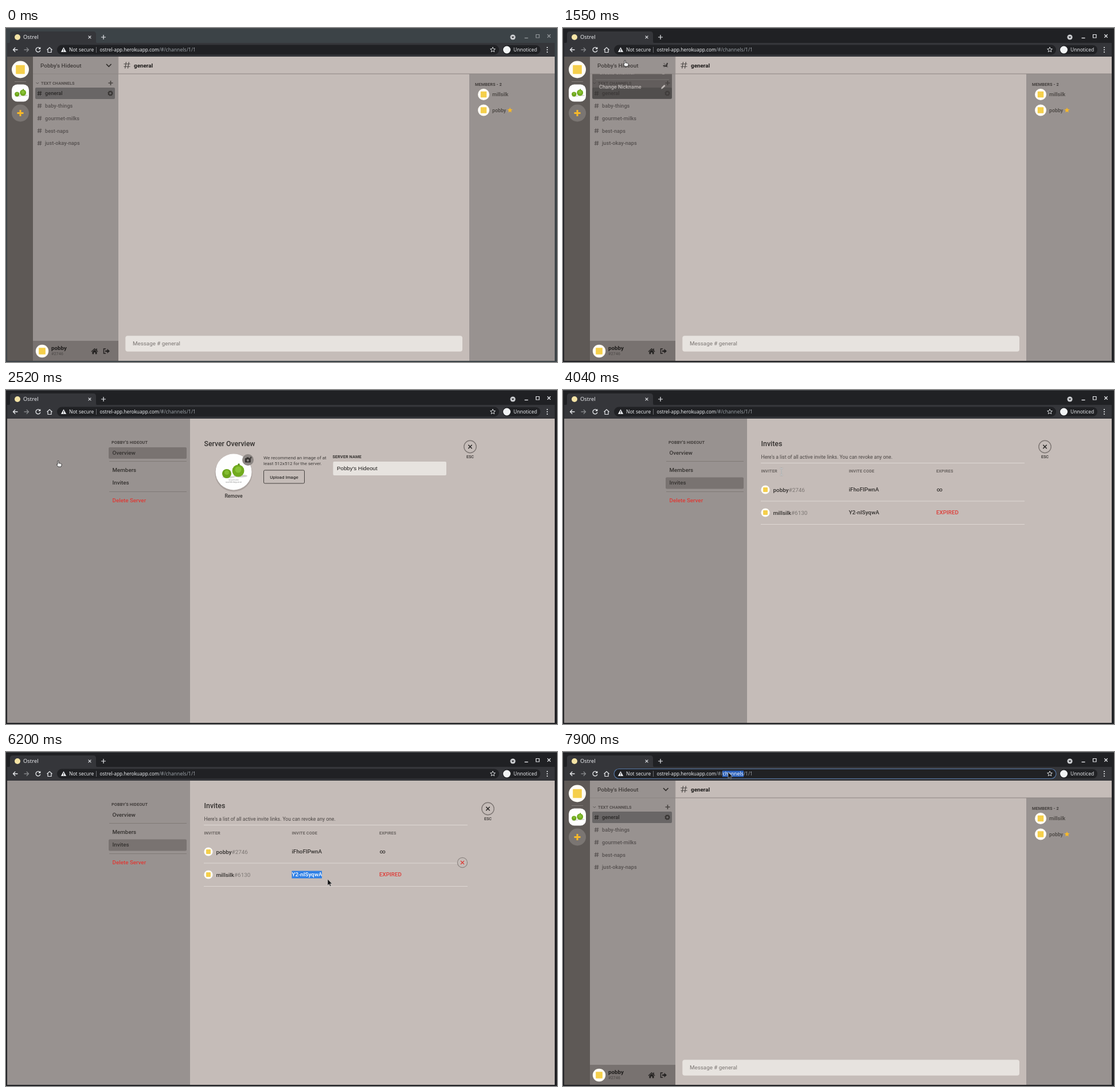
Write an HTML page that moves like this. It is 961 by 583 pixels and loops after 8 s.

```html
<!DOCTYPE html>
<html lang="en">
<head>
<meta charset="utf-8">
<title>Server settings</title>
<style>
html, body { margin: 0; width: 100%; height: 100%; overflow: hidden; background: #202124; }
svg { display: block; width: 961px; height: 583px; font-family: Roboto, sans-serif; }
.ui { font-family: "Noto Sans", sans-serif; }
.field { font-family: "Liberation Sans", sans-serif; }
text { white-space: pre; }
</style>
</head>
<body>
<svg id="stage" viewBox="0 0 961 583"></svg>
<script>
const PALE = '#c5bcb8', SIDE = '#989290', INK = '#353230', DIM = '#565150',
      FIELD = '#e7e3df', RED = '#de3a35', GOLD = '#f7b928', LOGO = '#f5cf4b',
      BLUE = '#2f80e6', LIGHT = '#e8eaed';

const rect = (x, y, w, h, fill, r = 0, more = '') =>
  `<rect x="${x}" y="${y}" width="${w}" height="${h}" fill="${fill}" rx="${r}" ${more}/>`;
const disc = (x, y, r, fill, more = '') =>
  `<circle cx="${x}" cy="${y}" r="${r}" fill="${fill}" ${more}/>`;
const line = (d, color, w = 1, more = '') =>
  `<path d="${d}" fill="none" stroke="${color}" stroke-width="${w}" ${more}/>`;
const shape = (d, fill, more = '') => `<path d="${d}" fill="${fill}" ${more}/>`;
// y is the middle of the line of text
const text = (x, y, str, size, fill = INK, weight = 400, more = '') =>
  `<text x="${x}" y="${y + size * .355}" font-size="${size}" fill="${fill}" font-weight="${weight}" ${more}>${str}</text>`;
const label = (x, y, str, fill = INK) => text(x, y, str, 7.3, fill, 700, 'letter-spacing=".12"');
const ui = (x, y, str, size, fill = LIGHT) => text(x, y, str, size, fill, 400, 'class="ui"');
const group = (id, body, more = '') => `<g id="${id}" ${more}>${body}</g>`;
const at = (x, y, body) => `<g transform="translate(${x} ${y})">${body}</g>`;
const cross = (x, y, r, color, w) =>
  line(`M${x - r} ${y - r}l${2 * r} ${2 * r}m0 ${-2 * r}l${-2 * r} ${2 * r}`, color, w);
const plus = (x, y, r, color, w) => line(`M${x - r} ${y}h${2 * r}M${x} ${y - r}v${2 * r}`, color, w);
const hash = (x, y, s, color) =>
  at(x, y, line(`M${-s} ${-s * .4}h${2 * s}M${-s} ${s * .4}h${2 * s}M${-s * .25} ${-s}l${-s * .35} ${2 * s}M${s * .6} ${-s}l${-s * .35} ${2 * s}`, color, 1.2));
const avatar = (x, y, r) => {
  const s = r * .52;
  return disc(x, y, r, '#fffdf5') + rect(x - s, y - s, 2 * s, 2 * s, LOGO, 1);
};
const star = (x, y, r, fill, stroke = 'none') => {
  const pts = [...Array(10).keys()].map(i => {
    const a = i * Math.PI / 5, q = i % 2 ? r * .45 : r;
    return `${(x + q * Math.sin(a)).toFixed(2)},${(y - q * Math.cos(a)).toFixed(2)}`;
  });
  return `<polygon points="${pts.join(' ')}" fill="${fill}" stroke="${stroke}" stroke-width=".9" stroke-linejoin="round"/>`;
};
const fruit = (x, y, s) => at(x, y, `<g transform="scale(${s})">` +
  `<ellipse cx="-9" cy="9" rx="11" ry="2" fill="#d9d9d6"/><ellipse cx="12" cy="7" rx="12" ry="2.4" fill="#d0d0cd"/>` +
  disc(-12, 3, 8, '#6ba31c') + disc(8, -2, 10.5, '#72ab1f') +
  disc(-12, 1, 4, '#84bd30') + disc(8, -4, 5.5, '#88c236') + disc(9, -13, 1.8, '#5c8c18') + '</g>');

function browser() {
  const tools =
    line('M20.500 38h-8m3.700-3.700L12.500 38l3.700 3.700', LIGHT, 1.3) +
    line('M31.500 38h8m-3.700-3.700L39.500 38l-3.700 3.700', '#85878a', 1.3) +
    line('M59.300 35.500a4 4 0 1 0 .6 3.500', LIGHT, 1.3) + shape('M60.300 33v4h-4z', LIGHT) +
    line('M71.500 38.200L76 34l4.500 4.200M73 37.500v5h6v-5', LIGHT, 1.2);
  const bar = rect(89, 29.5, 771, 17, '#202124', 8.5) +
    shape('M100.500 33.500l4.700 8.500h-9.400z', LIGHT) + line('M100.500 36.500v2.500m0 .8v1.200', '#202124') +
    ui(110, 38, 'Not secure', 8.5) + line('M157.500 33v10', '#6a6c70') +
    group('ring', rect(89, 29.5, 771, 17, 'none', 8.5, 'stroke="#5779a8" stroke-width="1.2"')) +
    rect(0, 32.5, 0, 11, '#2c62bd', 0, 'id="mark"') +
    ui(163.5, 38, 'ostrel-app.herokuapp.com', 8.3) +
    ui(267, 38, '/#/', 8.3, '#9aa0a6') + text(278.5, 38, 'channels', 8.6, '#9aa0a6', 400, 'class="ui" id="word"') +
    ui(315, 38, '/1/1', 8.4, '#9aa0a6') + star(849, 38, 4.6, 'none', LIGHT) +
    rect(866, 30, 66, 16, '#202124', 8) + disc(873.5, 38, 6.5, '#f1f3f4') + ui(885, 38, 'Unnoticed', 8.5) +
    [34, 38, 42].map(y => disc(944, y, 1.1, LIGHT)).join('');
  return rect(0, 0, 961, 583, '#202124', 0, 'id="frame"') + line('M0 .5H961', '#4a4c50') +
    rect(2, 26, 955, 555, '#35363a') +
    shape('M3 27q4 0 4-4V11q0-5 5-5h140q5 0 5 5v12q0 4 4 4z', '#35363a') +
    disc(20, 16, 5, '#f4e3a5') + ui(30, 16, 'Ostrel', 9.4) +
    cross(146, 16, 2.4, LIGHT, 1.1) + plus(170, 16, 4, LIGHT, 1.2) +
    disc(884, 16, 4.6, '#c9cbce') + shape('M881.700 15h4.600l-2.300 2.800z', '#202124') +
    group('buttons', line('M904.500 17.500h6', LIGHT, 1.4) + line('M924.500 11.500h5.500v5.500h-5.500z', LIGHT, 1.2) + cross(947, 14, 2.7, LIGHT, 1.3)) +
    tools + bar;
}

function chat() {
  const names = ['general', 'baby-things', 'gourmet-milks', 'best-naps', 'just-okay-naps'];
  const rows = names.map((n, i) => {
    const y = 114 + i * 21.75, color = i ? DIM : '#2b2928';
    return hash(58.5, y, 3.8, color) + text(68, y, n, 9.2, color, 500);
  }).join('');
  const items = ['Invite People', 'Server Settings', 'Create Channel', 'Change Nickname'].map((n, i) => {
    const y = 98 + 25 * i;
    return text(63, y, n, 9, '#d6d1ce', 500) +
      (i ? line(`M57 ${y - 12.5}h128`, '#74706d', .8) : '') +
      (i == 3 ? shape(`M171 ${y + 4}l.6-2.600 5-5 2 2-5 5z`, '#d6d1ce') : disc(175, y, 3.4, '#d6d1ce'));
  }).join('');
  const members = [['millsilk', 116], ['pobby', 143.5]].map(([n, y]) =>
    avatar(833, y, 10) + text(848, y, n, 8.8, '#484441', 500)).join('');
  return rect(2, 50, 955, 531, PALE) + rect(2, 50, 45, 531, '#5e5956') + rect(47, 50, 149, 531, SIDE) +
    rect(808, 80, 149, 501, SIDE) +
    avatar(25, 72.5, 15) + line('M15 93.500h20', '#817b77') +
    rect(10, 98.5, 30, 30, '#fefefe', 9.5) + fruit(25.5, 114, .52) +
    disc(25, 148.5, 15, '#7a7572') + plus(25, 148.5, 5.5, GOLD, 3) +
    rect(51, 104, 139, 20, '#696666', 2) + rows +
    line('M52.500 95l2.300 2.300 2.300-2.300', DIM) + label(61, 96, 'TEXT CHANNELS', '#504b49') + plus(182.5, 96, 4, '#484441', 1.6) +
    disc(182, 114, 3, 'none', 'stroke="#393634" stroke-width="2"') + disc(182, 114, 4.1, 'none', 'stroke="#393634" stroke-width="1.2" stroke-dasharray="1.6 1.6"') +
    `<g clip-path="url(#below)">${group('menu', rect(51, 84, 139, 110, '#454140', 3) + items)}</g>` +
    rect(47, 50, 149, 30, SIDE) + text(60, 65, "Pobby's Hideout", 9.9, '#403c3a', 500) +
    group('chevron', line('M175 63l4.300 4.300 4.300-4.300', '#302d2b', 1.7)) + group('shut', cross(179.3, 65, 3.6, '#302d2b', 1.6)) +
    line('M47 80H957', '#8c8582') + line('M196 50v30', '#a8a09c', .7) +
    hash(211, 65, 5.6, '#4d4947') + text(223, 65, 'general', 9.9, '#1c1a19', 700) +
    label(818, 98.5, 'MEMBERS - 2', '#413d3b') + members + star(879, 143.5, 4.8, GOLD) +
    rect(208.3, 537.3, 587.7, 27.5, FIELD, 4) + text(221, 551, 'Message # general', 9.8, '#7c7774') +
    rect(47, 546, 149, 35, '#787270') + avatar(63, 564, 11.2) +
    text(79, 559, 'pobby', 9.8, '#1f1d1c', 700) + text(79, 568, '#2746', 7.3, '#4c4846') +
    shape('M148.500 564.500l6-5.500 2.800 2.500v-2h1.500v3.400l1.700 1.600-.8.9-5.200-4.700-5.200 4.700zM150.500 565.200l4-3.600 4 3.600v4h-2.700v-3h-2.600v3h-2.700z', '#242221') +
    line('M174 560h-3.500v8h3.500', '#242221', 1.5) + shape('M173 562.700h3.500v-2.700l4.500 4-4.500 4v-2.700h-3.500z', '#242221');
}

const settings = () =>
  rect(2, 50, 955, 531, PALE) + rect(2, 50, 319, 531, SIDE) +
  rect(179, 100, 136, 20, '#8a8482', 2, 'id="hover"') + rect(179, 100, 136, 20, '#797371', 2, 'id="chosen"') +
  label(184, 91, "POBBY'S HIDEOUT", '#403c3a') +
  [['Overview', 110], ['Members', 140], ['Invites', 162]].map(([n, y]) => text(185.5, y, n, 9.8, INK, 500)).join('') +
  text(185.5, 192.5, 'Delete Server', 9.8, RED, 500) + line('M180 124.500h135M180 177.500h135', '#807a77');

const escape = x => disc(x, 99, 10.7, 'none', 'stroke="#7d7673" stroke-width="1.4"') + cross(x, 99, 3.2, '#262423', 1.5) +
  text(x, 116.5, 'ESC', 7.2, INK, 500, 'text-anchor="middle"');

const overview = () =>
  text(345.5, 94, 'Server Overview', 12.3, INK, 500) +
  disc(397, 145, 32.5, '#8c8480', 'opacity=".45"') + disc(397, 143, 31.5, '#fefefe') + fruit(397, 143, 1) +
  text(397, 157, 'two green peas', 2.6, '#999', 400, 'text-anchor="middle"') +
  text(397, 161.5, 'round little things at rest', 2.6, '#888', 400, 'text-anchor="middle"') +
  disc(422, 122, 10, '#8d8784') + rect(416.8, 119, 10, 7.5, INK, 1) + rect(419.5, 117.5, 4, 3, INK) +
  disc(421.8, 122.8, 2.1, '#8d8784') + plus(427, 118, 1.8, INK, 1) +
  text(397, 185, 'Remove', 8.6, INK, 500, 'text-anchor="middle"') +
  text(449, 118, 'We recommend an image of at', 8.05, '#413d3b') + text(449, 128.5, 'least 512x512 for the server.', 8.05, '#413d3b') +
  rect(449.5, 140, 71, 23, 'none', 2, 'stroke="#45413f"') + text(485, 152, 'Upload Image', 8, INK, 500, 'text-anchor="middle"') +
  label(569.5, 116, 'SERVER NAME') + rect(570.5, 125, 197.5, 24, FIELD, 2) +
  text(577, 137, "Pobby's Hideout", 9.76, '#1e1c1b', 400, 'class="field"') + escape(809.5);

function invites() {
  const row = (y, name, tag, code) => avatar(353, y, 7.6) +
    text(366.5, y, `${name}<tspan fill="#7d7774" font-weight="400">${tag}</tspan>`, 9.9, INK, 500) +
    text(498.5, y, code, 9.8, INK, 500);
  return text(345.5, 94, 'Invites', 12.4, INK, 500) +
    text(345.5, 117, "Here's a list of all active invite links. You can revoke any one.", 8.62, '#4c4745') +
    line('M345 127.500H805M345 194H805M345 234.500H805', '#ded8d4') +
    label(345.5, 141, 'INVITER', '#6a6461') + label(498.5, 141, 'INVITE CODE', '#6a6461') + label(651, 141, 'EXPIRES', '#6a6461') +
    row(174, 'pobby', '#2746', 'iFhoFIPwnA') + row(214, 'millsilk', '#6130', 'Y2-nISyqwA') +
    text(651.5, 174, '∞', 9.8, INK, 500) + text(651, 214, 'EXPIRED', 9.8, RED, 500) +
    `<g clip-path="url(#picked)">${rect(498, 207.5, 54, 13, BLUE)}${text(498.5, 214, 'Y2-nISyqwA', 9.8, '#fff', 500)}</g>` +
    group('revoke', disc(796, 0, 8.6, PALE, 'stroke="#8d8683" stroke-width="1.2"') + cross(796, 0, 3, RED, 1.3)) + escape(840.5);
}

const beam = 'M-2.500-6h2L0-5.500.5-6h2M0-5.500V5.500M-2.500 6h2L0 5.500.5 6h2';
const pointers =
  group('arrow', shape('M0 0V10.800L2.500 8.600 4.200 12.300 5.900 11.500 4.200 7.900H7.500Z', '#111', 'stroke="#ddd" stroke-width=".5"')) +
  group('hand', shape('M-1 1Q0-.5 1 1V5Q2.200 4.200 2.900 5.200 4 4.600 4.600 5.700 6 5.300 6 6.800V8.500L5 11H0L-2.500 7.800Q-3 6-1 7Z', '#f5f5f5', 'stroke="#222" stroke-width=".8" stroke-linejoin="round"')) +
  group('beam', line(beam, '#777', 1.8) + line(beam, '#fff', .9));

document.getElementById('stage').innerHTML =
  `<defs><clipPath id="below">${rect(47, 80, 149, 400, '#000')}</clipPath>` +
  `<clipPath id="picked">${rect(498.5, 200, 0, 30, '#000', 0, 'id="drag"')}</clipPath></defs>` +
  browser() + group('chat', chat()) +
  group('settings', settings() + group('overview', overview()) + group('invites', invites())) +
  group('pointer', pointers);

// time, x, y, shape
const path = [
  [720, 616, 337, 'arrow'], [900, 470, 252, 'arrow'], [1090, 190, 104, 'hand'], [1270, 120, 67, 'hand'], [1450, 108, 57, 'hand'],
  [1550, 108, 56, 'hand'], [1740, 106, 62, 'hand'], [2010, 94, 108, 'hand'], [2320, 91, 123, 'hand'],
  [2520, 91, 123, 'hand'], [2700, 112, 130, 'arrow'], [2900, 172, 150, 'hand'], [3170, 196, 160, 'hand'],
  [3450, 199, 160, 'hand'], [3550, 240, 157, 'hand'], [3730, 335, 145, 'arrow'], [3920, 379, 140, 'beam'],
  [4140, 384, 147, 'beam'], [4330, 425, 192, 'arrow'], [4600, 495, 213, 'beam'], [4820, 500, 214, 'beam'],
  [5020, 500, 214, 'beam'], [5640, 556, 218, 'beam'], [6199, 556, 218, 'beam'],
  [6200, 561, 222, 'arrow'], [6390, 660, 172, 'arrow'], [6580, 825, 104, 'hand'], [6680, 838, 101, 'hand'], [6770, 838, 101, 'arrow'],
  [7050, 834, 94, 'arrow'], [7240, 670, 52, 'arrow'], [7430, 380, 27, 'arrow'], [7520, 310, 36, 'beam'], [7640, 301, 36, 'beam'],
  [7800, 301, 34, 'arrow'], [7899, 301, 34, 'arrow'], [7900, 288, 35, 'arrow']
];
const bursts = [720, 1550, 2420, 3270, 4140, 5020, 6200, 7050, 7900];
const STEP = 92, LOOP = 8000;
const el = {};
document.querySelectorAll('[id]').forEach(n => el[n.id] = n);
const show = (id, on) => { el[id].style.display = on ? '' : 'none'; };
const put = (id, values) => { for (const k in values) el[id].setAttribute(k, values[k]); };

function pose(t) {
  const i = path.findLastIndex(p => p[0] <= t);
  if (i < 0) return null;
  const a = path[i], b = path[i + 1] || a;
  const k = b === a ? 0 : (t - a[0]) / (b[0] - a[0]);
  return { x: a[1] + (b[1] - a[1]) * k, y: a[2] + (b[2] - a[2]) * k, kind: a[3] };
}

function draw(now) {
  const start = bursts.findLast(b => b <= now) || 0;
  const t = start + Math.floor((now - start) / STEP + .02) * STEP;
  const inSettings = t >= 2420 && t < 6750, inInvites = t >= 3360;
  const p = pose(t);

  show('pointer', p);
  if (p) {
    put('pointer', { transform: `translate(${p.x.toFixed(1)} ${p.y.toFixed(1)})` });
    for (const k of ['arrow', 'hand', 'beam']) show(k, k === p.kind);
  }
  const focused = t >= 1550;
  put('frame', { fill: focused ? '#202124' : '#3c4347' });
  put('buttons', { opacity: focused ? 1 : .5 });

  show('chat', !inSettings);
  show('settings', inSettings);
  show('overview', !inInvites);
  show('invites', inInvites);

  const open = t < 1550 || t >= 2420 ? 0 : Math.min(1, .36 + (t - 1550) / 92 * .45);
  put('menu', { transform: `translate(0 ${(-110 * (1 - open)).toFixed(1)})`, opacity: Math.min(1, open * 1.8) });
  put('chevron', { transform: `rotate(${-90 * open} 179.3 65)` });
  show('chevron', open < 1);
  show('shut', open > 0);
  put('shut', { opacity: open });

  if (inSettings) {
    put('chosen', { y: inInvites ? 152.5 : 100 });
    const over = p.x > 179 && p.x < 315 && [100, 130, 152.5].find(y => p.y >= y && p.y < y + 20);
    show('hover', over);
    if (over) put('hover', { y: over });
    const row = p.x > 345 && p.x < 805 && p.y > 154 && p.y < 234;
    show('revoke', inInvites && row);
    put('revoke', { transform: `translate(0 ${p.y < 194 ? 153 : 193})` });
    put('drag', { width: t < 5020 ? 0 : Math.max(0, Math.min(52.5, p.x - 498.5)) });
  }

  const typing = t >= 7600, one = t >= 7690;
  show('ring', typing);
  put('mark', { x: one ? 278 : 163, width: !typing ? 0 : one ? 37 : 167 });
  put('word', { fill: typing ? '#fff' : '#9aa0a6' });
}

function tick() {
  draw(performance.now() % LOOP);
  requestAnimationFrame(tick);
}
tick();
</script>
</body>
</html>
```
